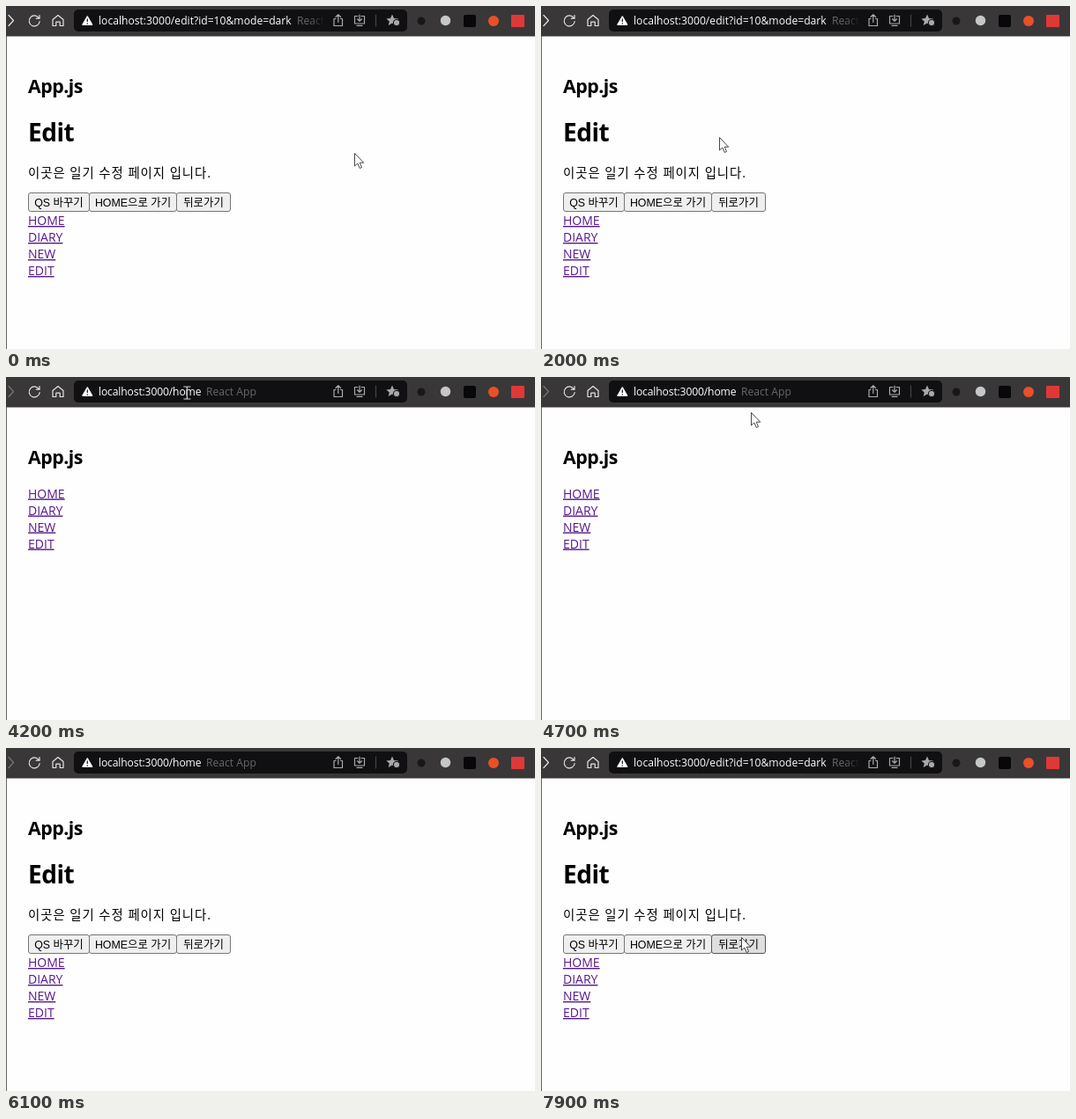
Recreate the animation shown at these times as an HTML page. Size 600 by 390 pixels, loop 8000 ms.

```html
<!DOCTYPE html>
<html lang="ko">
<head>
<meta charset="utf-8">
<title>Edit page</title>
<style>
html, body { margin: 0; height: 100%; overflow: hidden; background: #fffeff; }
svg { display: block; font-family: "Open Sans", "Noto Sans CJK KR", "Noto Sans CJK", sans-serif; }
.icon { fill: none; stroke: #e6e4e6; stroke-width: 1.2; stroke-linecap: round; stroke-linejoin: round; }
.dim { stroke: #aaa8aa; }
.url { font-size: 12.15px; fill: #fff; }
.bold { font-weight: 700; letter-spacing: -.5px; }
.links text { font-size: 14px; fill: #551a8b; text-decoration: underline; }
.button rect { fill: #efefef; stroke: #767676; }
.button text { font: 12.4px "Liberation Sans", "Noto Sans CJK KR", "Noto Sans CJK", sans-serif; text-anchor: middle; }
.button.hover rect { fill: #dfdfdf; stroke: #555; }
</style>
</head>
<body>
<svg width="600" height="390" viewBox="0 0 600 390">
  <defs>
    <linearGradient id="fade" gradientUnits="userSpaceOnUse" x1="345" x2="362" y1="0" y2="0">
      <stop stop-color="#69676a"/><stop offset="1" stop-color="#100f12"/>
    </linearGradient>
  </defs>
  <rect width="600" height="390" fill="#fffeff"/>
  <path d="M.5 34V390" stroke="#666"/>

  <rect width="600" height="34.5" fill="#3a3739"/>
  <rect x="77" y="4" width="378" height="25" rx="5" fill="#100f12"/>
  <g class="icon">
    <path id="forward" d="M3 10.5 8.5 16.5 3 22.5"/>
    <path d="M37.3 13.7A6 6 0 1 0 38.2 17.5M38 10.5V14.2H34.3"/>
    <path d="M53 15.5 59 10.5 65 15.5V22.5H61.2V18.2H56.8V22.5H53Z"/>
  </g>
  <path d="M92.3 11.5 98 21.3H86.6Z" fill="#fff" stroke="#fff" stroke-linejoin="round"/>
  <path d="M92.3 14.5V18M92.3 19.2V20.5" stroke="#100f12" stroke-width="1.2"/>
  <text class="url" id="url" x="105" y="21"></text>
  <text class="url" id="title" y="21"></text>
  <g class="icon dim">
    <path d="M374 14.5H372V22.5H381.5V14.5H379.5M376.8 18.5V10M374 12.5 376.8 9.8 379.6 12.5"/>
    <path d="M399 11.5H395.5V20H406.5V11.5H403M401 10V17M398.5 14.8 401 17.2 403.5 14.8M398 22.3H404"/>
    <path d="M419.5 10V23" stroke="#454347"/>
  </g>
  <path d="M438 9.5 440 14 445 14.4 441.3 17.5 442.4 22 438 19.6 433.7 22 434.8 17.5 431.3 14.4 436 14Z" fill="#aaa8aa"/>
  <circle cx="443" cy="19" r="3.7" fill="#aaa8aa" stroke="#100f12"/>
  <circle cx="471" cy="17" r="4.5" fill="#191819"/>
  <circle cx="498.500" cy="16.500" r="5.700" fill="#c5c7c9"/>
  <rect x="519" y="10" width="14" height="14" rx="2" fill="#08080a"/>
  <circle cx="553" cy="17" r="6" fill="#e95028"/>
  <rect x="573" y="10" width="15" height="14" rx="1" fill="#df3937"/>

  <text class="bold" x="25" y="99" font-size="21.3">App.js</text>
  <g id="edit">
    <text class="bold" x="25" y="154" font-size="28">Edit</text>
    <text x="25" y="195" font-size="14.4" letter-spacing=".95">이곳은 일기 수정 페이지 입니다.</text>
    <g id="buttons"></g>
  </g>
  <g class="links" id="links">
    <text x="25" y="137.500">HOME</text>
    <text x="25" y="156.500">DIARY</text>
    <text x="25" y="175.500">NEW</text>
    <text x="25" y="194.500">EDIT</text>
  </g>

  <path id="arrow" d="M.5 .5V15L3.800 12 6.300 17.500 8.500 16.500 6.200 11.200H10.700Z" fill="#fff" stroke="#333" stroke-width=".9"/>
  <path id="beam" d="M-4-7H-1Q0-7 0-6Q0-7 1-7H4M0-6V6M-4 7H-1Q0 7 0 6Q0 7 1 7H4" fill="none" stroke="#d4d2d4" stroke-width="1.200"/>
</svg>
<script>
const LOOP = 8000;
const el = id => document.getElementById(id);
const show = (node, on) => node.setAttribute("visibility", on ? "visible" : "hidden");

// Pointer stops: time, x, y
const stops = [
  [0, 395, 167], [500, 395, 167], [1100, 225, 24], [1300, 225, 24],
  [1600, 290, 20], [2000, 202, 149], [2700, 163, 222], [3500, 163, 222],
  [4100, 200, 18], [4350, 215, 18], [4700, 238, 40], [4950, 238, 40],
  [5400, 30, 15], [5600, -25, 15], [6200, -25, 15], [6400, 35, 40],
  [7200, 227, 215], [LOOP, 227, 215]
];

const buttons = [
  ["QS 바꾸기", 25.5, 69], ["HOME으로 가기", 94.5, 99], ["뒤로가기", 193.5, 61]
].map(([label, x, w]) => {
  const node = document.createElementNS("http://www.w3.org/2000/svg", "g");
  node.innerHTML = `<rect x="${x}" y="212.5" width="${w}" height="21" rx="2.5"/>
    <text x="${x + w / 2}" y="227.5">${label}</text>`;
  el("buttons").append(node);
  return { node, x, w };
});

function pointerAt(t) {
  const i = stops.findIndex(s => s[0] > t);
  const [t0, x0, y0] = stops[i - 1], [t1, x1, y1] = stops[i];
  const u = (t - t0) / (t1 - t0), k = u * u * (3 - 2 * u);
  return [x0 + (x1 - x0) * k, y0 + (y1 - y0) * k];
}

function draw(t) {
  const [x, y] = pointerAt(t);
  const homePage = t >= 3000 && t < 6050;
  const homeUrl = t >= 3000 && t < 6200;

  show(el("edit"), !homePage);
  el("links").setAttribute("transform", `translate(0 ${homePage ? 0 : 111.5})`);
  el("forward").style.stroke = homeUrl ? "#777577" : "#e6e4e6";

  el("url").textContent = "localhost:3000/" + (homeUrl ? "home" : "edit?id=10&mode=dark");
  el("url").style.letterSpacing = homeUrl ? "-.15px" : "0";
  el("title").textContent = homeUrl ? "React App" : "React";
  el("title").setAttribute("x", homeUrl ? 227 : 330);
  el("title").style.fill = homeUrl ? "#69676a" : "url(#fade)";

  for (const b of buttons) {
    const over = x > b.x && x < b.x + b.w && y > 212 && y < 234;
    b.node.setAttribute("class", over ? "button hover" : "button");
  }

  const typing = x > 100 && x < 365 && y > 4 && y < 30;
  show(el("arrow"), !typing);
  show(el("beam"), typing);
  el(typing ? "beam" : "arrow").setAttribute("transform", `translate(${x} ${y})`);
}

const start = performance.now();
function frame() {
  draw((performance.now() - start) % LOOP);
  requestAnimationFrame(frame);
}
frame();
</script>
</body>
</html>
```
